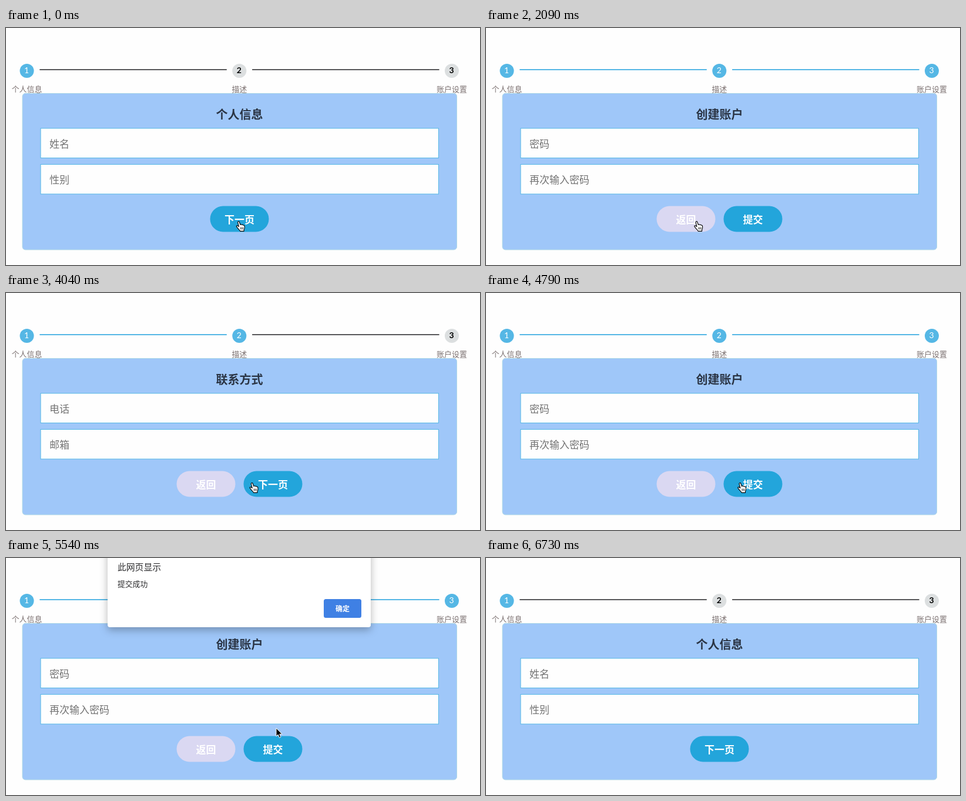
An HTML page for the animation above (7.03 s loop, 807 by 404 pixels).

```html
<!DOCTYPE html>
<html lang="zh-CN">
<head>
<meta charset="utf-8">
<title>分步表单</title>
<style>
  html, body { margin: 0; width: 100%; height: 100%; overflow: hidden; background: #fefefe; }
  svg { position: absolute; left: 0; top: 0; width: 807px; height: 404px; overflow: hidden; }
  text { font-family: "Noto Sans CJK SC", "Noto Sans CJK", sans-serif; }
  .mid { text-anchor: middle; }
  .num { font: 700 14px Lato, sans-serif; }
  .label { font-size: 12.9px; fill: #7a6f6f; }
  .title { font-size: 20px; font-weight: 700; fill: #2a3444; }
  .hint { font-size: 17px; fill: #737373; }
  .btn { font-size: 17px; font-weight: 700; fill: #fff; }
  .field { fill: #fefefe; stroke: #55b7e5; }
  #dialog { transform-origin: 397px 102px; }
  #sheet { filter: drop-shadow(0 5px 7px rgba(0, 0, 0, .28)); }
</style>
</head>
<body>
<svg id="page">
  <g id="steps"></g>
  <rect x="28" y="111.5" width="739.5" height="266.5" rx="5" fill="#9fc7f9" stroke="#add8e6"/>
  <text id="title" class="title mid" x="397.5" y="155"></text>
  <rect class="field" x="59" y="171" width="677.5" height="50.5"/>
  <rect class="field" x="59" y="232.5" width="677.5" height="50.5"/>
  <text id="hint1" class="hint" x="74" y="203.5"></text>
  <text id="hint2" class="hint" x="74" y="264.7"></text>
  <g id="back" transform="translate(290.5 303.5)">
    <rect width="100" height="44" rx="22" fill="#dad8f2"/>
    <text class="btn mid" x="50" y="29.7">返回</text>
  </g>
  <g id="next">
    <rect width="100" height="44" rx="22" fill="#23a5db"/>
    <text id="nextText" class="btn mid" x="50" y="29.7"></text>
  </g>
</svg>
<svg id="dialog">
  <rect id="sheet" x="173" y="-20" width="448" height="138" rx="4" fill="#fff"/>
  <text x="190" y="20.5" font-size="14.8" fill="#2c2c2e">此网页显示</text>
  <text x="190" y="49.4" font-size="12.8" fill="#2c2c2e">提交成功</text>
  <rect x="541" y="70" width="64" height="32" rx="3.5" fill="#3f80e4"/>
  <text class="mid" x="573" y="90.6" font-size="12" font-weight="700" fill="#fff">确定</text>
</svg>
<svg id="pointer">
  <g id="hand" stroke-linejoin="round" stroke-linecap="round">
    <path fill="#fff" stroke="#000" stroke-width="1.1" d="M3 2.2C2.8 .4 5.1 .1 5.8 1.8L7.5 6.5C8.3 5.4 9.8 5.6 10.2 6.7C11 5.9 12.2 6.2 12.6 7.3C13.6 6.9 14.4 7.6 14.6 8.8C14.9 11 14.7 13 13.7 15L13.5 17.4H7.2C6.7 15.6 4.4 14 2.4 11.4C1.2 10 .3 8.9 1 8.2C2 7.4 3.5 8.3 4.9 9.5Z"/>
    <path fill="none" stroke="#000" stroke-width=".8" d="M8 11V14M10 11V14M12 11V14"/>
  </g>
  <path id="arrow" fill="#000" stroke="#fff" stroke-width="1" d="M0 0V14L3.2 11L5.4 16.3L7.9 15.2L5.7 10.2H10Z"/>
</svg>
<script>
const LOOP = 7030;
const BLUE = '#55b7e5';
const $ = id => document.getElementById(id);

const forms = [
  { title: '个人信息', hints: ['姓名', '性别'], next: '下一页' },
  { title: '联系方式', hints: ['电话', '邮箱'], next: '下一页' },
  { title: '创建账户', hints: ['密码', '再次输入密码'], next: '提交' }
];

// Each table row: start time, then the state held until the next row.
const pageSteps = [[0, 0], [450, 1], [1490, 2], [2390, 1], [3140, 0], [4040, 1], [4490, 2], [6440, 0]];

// opacity, tilt in degrees, shift in px, scale
const dialogSteps = [
  [0, 0, 0, 0, 1], [5240, .22, 5, -11.8, .99], [5390, 1, 0, 0, 1],
  [6290, .22, 5, -11.8, .99], [6440, 0, 0, 0, 1]
];

// x and y of the hotspot, cursor shape
const cursorSteps = [
  [0, 396.5, 329, 'hand'], [900, 407, 325, 'hand'], [1040, 425, 320.5, 'hand'], [1190, 436, 329, 'hand'],
  [1790, 426, 329, 'hand'], [1940, 386, 329, 'hand'], [2090, 359, 329, 'hand'],
  [3290, 382, 327, 'hand'], [3440, 419.3, 323, 'hand'],
  [4790, 433, 323, 'hand'], [4940, 443.5, 323, 'hand'],
  [5240, 443, 321.5, 'arrow'], [5540, 460, 290, 'arrow'], [5690, 502, 212, 'arrow'],
  [5840, 544, 135, 'arrow'], [5990, 564, 97, 'arrow'], [6140, 569.5, 87, 'arrow'],
  [6440, 655, 230, 'arrow'], [6590, 779, 387, 'arrow'], [6730, 0, 0, 'none']
];

function at(steps, t) {
  let row = steps[0];
  for (const s of steps) if (s[0] <= t) row = s;
  return row.slice(1);
}

const stepX = [35.5, 397.3, 759];
$('steps').innerHTML = ['个人信息', '描述', '账户设置'].map((label, i) => `
  ${i ? `<rect class="line" x="${stepX[i - 1] + 21.8}" y="70" width="318.5" height="2"/>` : ''}
  <circle class="dot" cx="${stepX[i]}" cy="73" r="12"/>
  <text class="num mid" x="${stepX[i] - .5}" y="77.2">${i + 1}</text>
  <text class="label mid" x="${stepX[i]}" y="108.8">${label}</text>`).join('');
const dots = document.querySelectorAll('.dot');
const nums = document.querySelectorAll('.num');
const lines = document.querySelectorAll('.line');

let shown = -1;
function showPage(n) {
  if (n === shown) return;
  shown = n;
  const form = forms[n];
  $('title').textContent = form.title;
  $('hint1').textContent = form.hints[0];
  $('hint2').textContent = form.hints[1];
  $('nextText').textContent = form.next;
  $('back').style.display = n ? '' : 'none';
  $('next').setAttribute('transform', `translate(${n ? 404.5 : 347.5} 303.5)`);
  dots.forEach((d, i) => d.setAttribute('fill', i <= n ? BLUE : '#dcdfe0'));
  nums.forEach((d, i) => {
    d.setAttribute('fill', i <= n ? '#fff' : '#000');
    d.style.fontWeight = i <= n ? 400 : 700;
  });
  lines.forEach((d, i) => d.setAttribute('fill', i < n ? BLUE : '#58585a'));
}

function showDialog([opacity, tilt, shift, scale]) {
  const style = $('dialog').style;
  style.opacity = opacity;
  style.transform = tilt
    ? `translateY(${shift}px) perspective(420px) rotateX(${tilt}deg) scale(${scale})`
    : 'none';
}

function showCursor([x, y, shape]) {
  for (const id of ['hand', 'arrow']) {
    const dx = id === 'hand' ? 5 : 0;
    $(id).style.display = id === shape ? '' : 'none';
    $(id).setAttribute('transform', `translate(${x - dx} ${y})`);
  }
}

const start = performance.now();
function draw() {
  const t = Math.max(0, performance.now() - start) % LOOP;
  showPage(at(pageSteps, t)[0]);
  showDialog(at(dialogSteps, t));
  showCursor(at(cursorSteps, t));
  requestAnimationFrame(draw);
}
draw();
</script>
</body>
</html>
```
